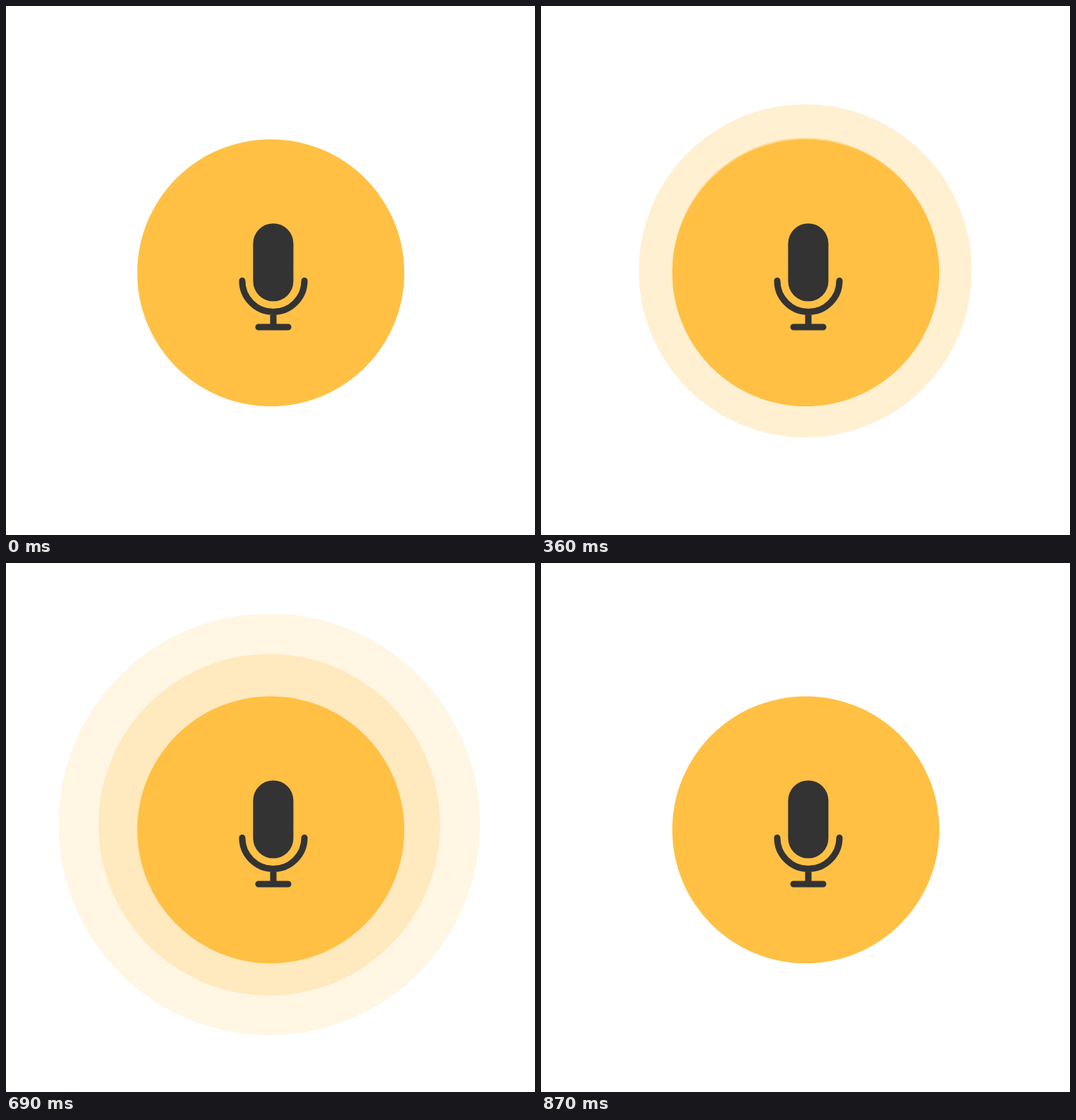
An HTML page that plays this animation: 748 by 748 pixels, repeating every 1.2 s.

```html
<!DOCTYPE html>
<html lang="en">
<head>
<meta charset="utf-8">
<title>Microphone pulse</title>
<style>
  html, body { margin: 0; width: 100%; height: 100%; overflow: hidden; background: #fff; }
  svg { display: block; width: 100%; height: 100%; }
</style>
</head>
<body>
<svg viewBox="0 0 748 748">
  <g fill="#ffc044">
    <circle id="outer" opacity="0"/>
    <circle id="inner" opacity="0"/>
    <circle cx="374.4" cy="377.3" r="188.8"/>
  </g>
  <rect x="349.4" y="307.4" width="57" height="110.2" rx="28.5" fill="#333"/>
  <path d="M334 388.5a44 44 0 0 0 88 0M378 433v21M357 454h42"
        fill="none" stroke="#333" stroke-width="9" stroke-linecap="round"/>
</svg>
<script>
  const LOOP = 1200, STEP = 30;
  const outer = document.getElementById('outer');
  const inner = document.getElementById('inner');

  // [time, opacity]
  const outerFade = [[120, .18], [240, .21], [480, .265], [600, .22], [750, .1], [840, 0]];
  const innerFade = [[330, .5], [480, .47], [600, .35], [750, .16], [870, 0]];

  function lerpTable(table, t) {
    if (t < table[0][0]) return 0;
    for (let i = 1; i < table.length; i++) {
      const [t0, a] = table[i - 1], [t1, b] = table[i];
      if (t < t1) return a + (b - a) * (t - t0) / (t1 - t0);
    }
    return 0;
  }

  function setRing(ring, cx, cy, r, opacity) {
    ring.setAttribute('cx', cx);
    ring.setAttribute('cy', cy);
    ring.setAttribute('r', Math.max(0, r));
    ring.setAttribute('opacity', opacity);
  }

  function draw(now) {
    const t = Math.floor((now % LOOP) / STEP) * STEP;
    const cx = 374.3 - .0045 * (t - 240);
    const s = (t - 360) / 120;
    setRing(outer, cx, 376.3 - .015 * (t - 240), 212.7 + .1893 * (t - 240), lerpTable(outerFade, t));
    setRing(inner, cx, 374.4 - 1.55 * s, 188 + 21.9 * s - .9 * s * s, lerpTable(innerFade, t));
  }

  const start = performance.now();
  function tick() {
    draw(performance.now() - start);
    requestAnimationFrame(tick);
  }
  tick();
</script>
</body>
</html>
```
